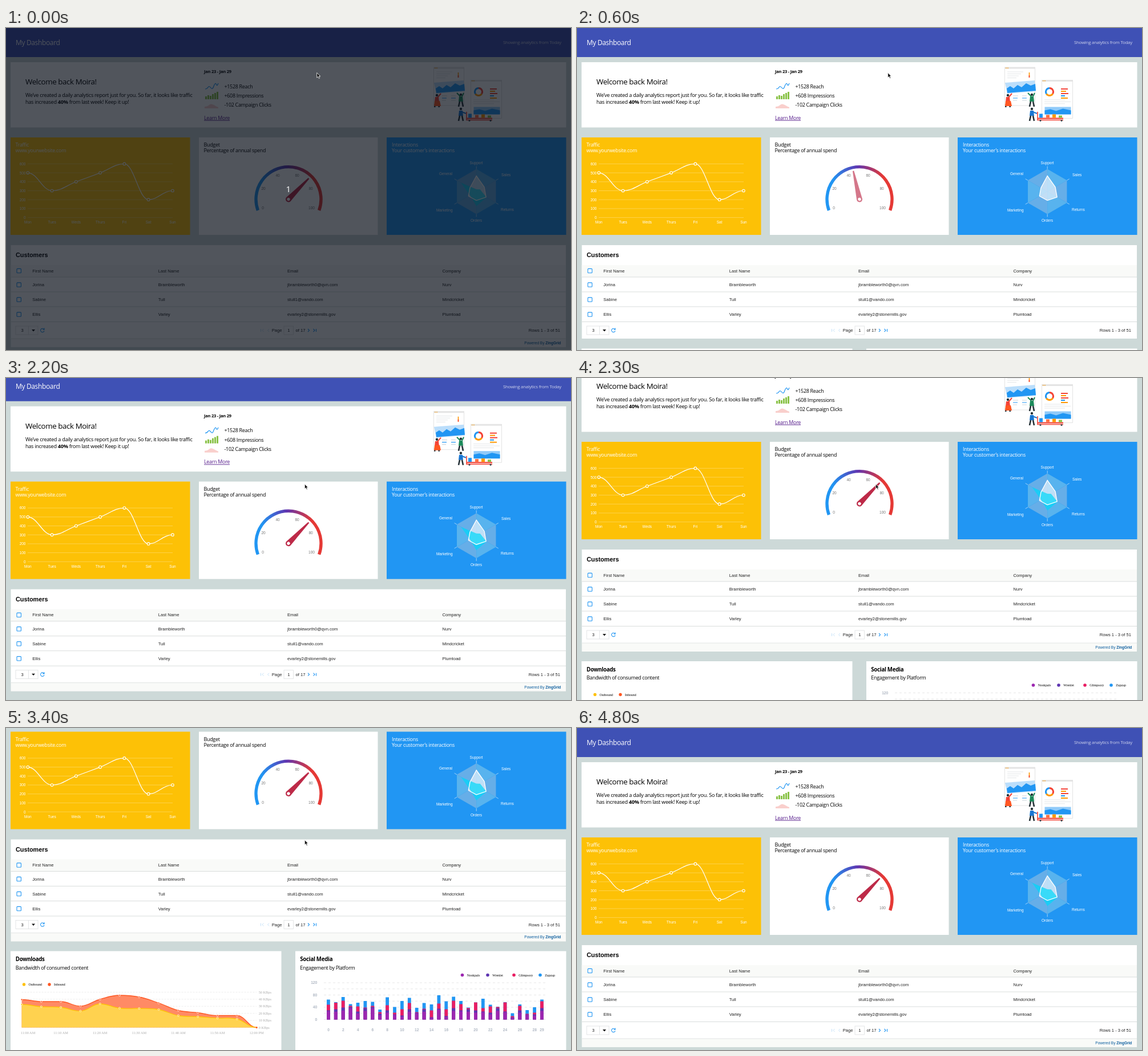
An HTML page for the animation above (5000 ms loop, 990 px wide and 565 px high).

```html
<!DOCTYPE html>
<html lang="en">
<head>
<meta charset="utf-8">
<title>My Dashboard</title>
<style>
html, body { margin: 0; width: 100%; height: 100%; overflow: hidden; background: #cdd9d8; }
svg { display: block; }
text { font: 7.6px "Liberation Sans", Arial, sans-serif; fill: #222; white-space: pre; }
.u { font: 8.9px "Open Sans", "Noto Sans", sans-serif; letter-spacing: -.03em; fill: #000; }
.s { font-size: 6.5px; }
.t { font: 6.3px "Liberation Serif", serif; fill: #aaa; }
.l { font: 5.9px "Liberation Serif", serif; fill: #000; }
.g { font-size: 6.7px; font-weight: bold; fill: #b0b8c4; }
.b { font-weight: bold; }
.w { fill: #fff; }
.m { text-anchor: middle; }
.e { text-anchor: end; }
</style>
</head>
<body>
<svg id="stage" width="990" height="565" viewBox="0 0 990 565"></svg>
<script>
const BLUE = '#2196f3', RED = '#f44336', GREEN = '#8bc34a';
const text = (x, y, s, cls = '', more = '') => `<text x="${x}" y="${y}" class="${cls}" ${more}>${s}</text>`;
const rect = (x, y, w, h, fill, more = '') => `<rect x="${x}" y="${y}" width="${w}" height="${h}" fill="${fill}" ${more}/>`;
const dot = (x, y, r, fill, more = '') => `<circle cx="${x}" cy="${y}" r="${r}" fill="${fill}" ${more}/>`;
const path = (d, fill, more = '') => `<path d="${d}" fill="${fill}" ${more}/>`;
const line = (d, color, w = 1, more = '') => path(d, 'none', `stroke="${color}" stroke-width="${w}" ${more}`);
const each = (list, f) => list.map(f).join('');
const range = n => [...Array(n).keys()];

// Smooth curve that stays level at every peak and dip
function spline(p) {
  const slope = p.map(([x, y], i) => {
    if (!i || i === p.length - 1) return 0;
    const a = y - p[i - 1][1], b = p[i + 1][1] - y;
    return a * b <= 0 ? 0 : (a + b) / (p[i + 1][0] - p[i - 1][0]);
  });
  return 'M' + p[0] + each(p.slice(1), ([x, y], i) => {
    const [x0, y0] = p[i], k = (x - x0) * .4;
    return `C${x0 + k},${y0 + slope[i] * k} ${x - k},${y - slope[i + 1] * k} ${x},${y}`;
  });
}

const header = () => rect(0, 0, 990, 51, '#3f51b5') +
  text(17, 29.8, 'My Dashboard', 'u w', 'style="font-size:12px"') +
  text(973, 28.3, 'Showing analytics from Today', 'u e', 'style="font-size:7.9px;fill:#cdd2ec"');

function illustration() {
  const person = (x, y, shirt) => dot(x, y - 7, 2.2, '#263238') +
    path(`M${x - 3},${y - 4}h6l1,9h-8z`, shirt) +
    line(`M${x - 2},${y + 5}l-2,9M${x + 2},${y + 5}l2,9`, '#263238', 2.6);
  const window = (x, y, w, h) => rect(x, y, w, h, '#fff', 'stroke="#ddd" stroke-width=".8"') +
    rect(x, y, w, 2.5, '#e4e4e4') + each([2, 4, 6], d => dot(x + d, y + 1.2, .7, '#ff9800'));
  return window(749.5, 69, 53, 67) +
    each(range(4), i => line(`M754,${77 + i * 3.5}h${28 - i * 4}`, '#e3e6e8', 1)) +
    line('M792.5,78v9', '#ff9800', 1.6) + line('M792.5,83v4', RED, 1.6) +
    path('M750,96L802,92L804,111L754,115Z', '#bbdefb') +
    path('M754,114L753,106L759,102L765,106L772,100L779,104L787,97L795,101L803,98L804,110Z', BLUE) +
    each(range(3), i => line(`M764,${119 + i * 4}h${9 - i}M780,${119 + i * 4}h8`, i == 1 ? BLUE : '#cfd8dc', 1.2)) +
    window(814.5, 91.5, 54, 67) +
    line('M828,105.5a6.5,6.5 0 0 1 5.5,10', RED, 3) + line('M833.5,115.5a6.5,6.5 0 0 1-11,0', '#ff9800', 3) +
    line('M822.5,115.5a6.5,6.5 0 0 1 5.5-10', BLUE, 3) +
    each([[13, RED], [10, '#ff9800'], [14, RED], [8, BLUE], [13, '#ff9800']], ([w, c], i) => rect(848, 106 + i * 4, w - 1, 2, c)) +
    each(range(3), i => line(`M819,${126 + i * 3.4}h${i == 1 ? 46 : 36}`, '#e3e6e8', 1)) +
    rect(819.5, 138.5, 46, 13, '#90caf9') + path('M819.5,151.5v-7l10,-2l10,3l12,-4l14,3v7z', BLUE) +
    person(755, 125, RED) + line('M756,122l6,-7', RED, 2) + path('M751,128h9l2,9h-12z', '#ff5722') +
    person(797, 124, '#1b8a5a') + line('M796,120l-6,-6M799,120l3,-6', '#1b8a5a', 2) +
    person(797, 149, '#1976d2') + line('M798,147l8,3', '#1976d2', 2) +
    line('M807,147v14.5h45', RED, 1.6) + rect(807, 157.5, 45, 2.2, RED) + dot(812, 162.5, 1.5, '#37474f') + dot(849, 162.5, 1.5, '#37474f') +
    each([[810, 7, BLUE], [822, 5, '#ff7043'], [833, 6, '#ff9800'], [844, 4, GREEN]], ([x, h, c]) => rect(x, 157.5 - h, 6, h, c));
}

const welcome = () => rect(8, 60, 973.5, 114.5, '#fff') +
  text(34, 99.2, 'Welcome back Moira!', 'u', 'style="font-size:13.3px"') +
  text(34, 121.3, 'We’ve created a daily analytics report just for you. So far, it looks like traffic', 'u', 'style="font-size:9.1px"') +
  text(34, 133.2, 'has increased <tspan class="b">40%</tspan> from last week! Keep it up!', 'u', 'style="font-size:9.1px"') +
  text(347, 79, 'Jan 23 - Jan 29', 'u b', 'style="font-size:7.5px"') +
  text(382.5, 105.8, '+1528 Reach', 'u') + text(382.5, 122, '+608 Impressions', 'u') + text(382.5, 138.2, '-102 Campaign Clicks', 'u') +
  text(347, 160.7, 'Learn More', 'u', 'style="fill:#551a8b;text-decoration:underline"') +
  line('M349,107Q352,107 354,104T359,105T364,102Q367,94 369,100Q370,102 372,97', BLUE, 1.2) +
  each([5, 7, 6, 9, 11, 13], (h, i) => rect(349 + i * 4, 125 - h, 3, h, GREEN)) +
  path('M348,141v-3q5,0 8,-3t8,0t8,4v2z', '#f9cfcc') + illustration();

function traffic() {
  const xs = range(7).map(i => 38.3 + i * 42.27), y = v => 332.6 - v * .157;
  const pts = [500, 300, 400, 500, 600, 200, 300].map((v, i) => [xs[i], y(v)]);
  return rect(8, 192, 314.5, 171, '#fdc106') + text(16.5, 208, 'Traffic', 'u w') + text(16.5, 218, 'www.yourwebsite.com', 'u w') +
    each(range(7), i => line(`M38,${y(i * 100)}H292`, '#fff', .8, 'opacity=".35"') + text(34.5, y(i * 100) + 2.4, i * 100, 's w e')) +
    each(['Mon', 'Tues', 'Weds', 'Thurs', 'Fri', 'Sat', 'Sun'], (d, i) => text(xs[i], 343.4, d, 's w m')) +
    line(spline(pts), '#fff', 1.2) + each(pts, ([x, y]) => dot(x, y, 2.3, '#fdc106', 'stroke="#fff" stroke-width="1.1"'));
}

const gauge = () => rect(338, 192, 313.5, 171, '#fff') + text(346.5, 208, 'Budget', 'u') + text(346.5, 218, 'Percentage of annual spend', 'u') +
  `<linearGradient id="arc" gradientUnits="userSpaceOnUse" x1="436" x2="554"><stop offset=".1" stop-color="${BLUE}"/>
   <stop offset=".47" stop-color="#5e35b1"/><stop offset=".85" stop-color="#e53935"/></linearGradient>` +
  line('M441.4,320A57,57 0 1 1 548.6,320', 'url(#arc)', 5.4) +
  each([[450, 316], [451, 282], [476, 258.5], [510, 258.5], [534, 282], [535.5, 316]], ([x, y], i) => text(x, y + 2.4, i * 20, 's m', 'style="fill:#777"')) +
  `<g id="needle">${path('M-1.2,-51L1.2,-51L5,0A5,5 0 0 1 -5,0Z', '#bd2a48')}${dot(0, 0, 2.7, '#fff')}</g>`;

const spoke = (r, i) => [824.2 + r * Math.sin(i * Math.PI / 3), 287 - r * Math.cos(i * Math.PI / 3)];
const star = radii => 'M' + radii.map(spoke).join('L') + 'Z';
const WHITE_R = [27.5, 16, 19.6, 15.5, 16, 13], CYAN_R = [4, 7.5, 20.5, 25.5, 13, 31];

const radar = () => rect(667, 192, 314.5, 171, BLUE) + text(676, 208, 'Interactions', 'u w') + text(676, 218, 'Your customer’s interactions', 'u w') +
  each(range(6), i => path(`M824.2,287L${spoke(39.5, i)}L${spoke(39.5, i + 1)}Z`, i % 2 ? '#66aee8' : '#58b3ee') +
    line(`M${spoke(39.5, i)}L${spoke(44.5, i)}`, '#fff', .8, 'opacity=".7"')) +
  text(824, 239.3, 'Support', 's w m') + text(868, 259.7, 'Sales', 's w') + text(867, 320.7, 'Returns', 's w') +
  text(824, 340.3, 'Orders', 's w m') + text(782.5, 321.8, 'Marketing', 's w e') + text(782, 258, 'General', 's w e') +
  `<g id="plot">${path(star(WHITE_R), '#fff', 'opacity=".6"')}<path id="cyan" fill="#00d9fa"/>${line(star(WHITE_R), '#fff', 1.3)}</g>`;

function customers() {
  const cols = [46.3, 266.7, 493, 764.5];
  const rows = [
    ['First Name', 'Last Name', 'Email', 'Company'],
    ['Jorina', 'Brambleworth', 'jbrambleworth0@qvn.com', 'Nurv'],
    ['Sabine', 'Tull', 'stull1@vando.com', 'Mindcricket'],
    ['Ellis', 'Varley', 'evarley2@stonemills.gov', 'Plumtoad']];
  const mid = [426, 450.5, 476.5, 502.5];
  const box = (x, w) => rect(x, 523, w, 15, '#fff', 'stroke="#dcdfe0" stroke-width=".8"');
  return rect(8.5, 381, 972.5, 164, '#fff') + text(17, 402.2, 'Customers', 'b', 'style="font-size:10.8px;fill:#000"') +
    rect(8.5, 416, 972.5, 21, '#f9faf8') +
    each(rows, (row, r) => each(row, (s, c) => text(cols[c], mid[r] + 2.7, s)) +
      rect(19, mid[r] - 3.6, 7.4, 7.4, '#fff', `rx="1" stroke="${BLUE}" stroke-width="1.1"`)) +
    each([437, 463, 489, 515.5], y => line(`M8.5,${y}H981`, '#d9dddc')) +
    box(17, 39) + line('M39.5,523v15', '#dcdfe0', .8) + text(28.5, 533.2, '3', 'm') + path('M45,529h6l-3,3.4z', '#111') +
    line('M66.5,528.5A3.3,3.3 0 1 0 67,531.5M67,526.5v2.7h-2.7', BLUE, 1.1) +
    line('M446.5,528v5M451.5,528l-2.5,2.5l2.5,2.5M461,528l-2.5,2.5l2.5,2.5', '#c5e2f8', 1) +
    text(465.7, 533.2, 'Page') + box(487, 16.5) + text(495.3, 533.2, '1', 'm') + text(507.5, 533.2, 'of 17') +
    line('M529,528l2.5,2.5l-2.5,2.5M538.5,528l2.5,2.5l-2.5,2.5M543.5,528v5', BLUE, 1.1) +
    text(971, 533.2, 'Rows 1 - 3 of 51', 'e') +
    `<g id="foot">${rect(8.5, 545, 972.5, 15, '#f9faf8')}${line('M8.5,545H981', '#e2e5e4')}
     ${text(972.3, 554.9, 'Powered By <tspan class="b">ZingGrid</tspan>', 's e', 'style="fill:#0b5d9e"')}</g>`;
}

function downloads() {
  const xs = range(13).map(i => 27.5 + i * 34.3), base = 711;
  const series = [
    ['#ff5722', '#ff8a65', [49, 45.5, 45.5, 37.5, 49.5, 56.5, 53.5, 43, 30, 26, 21, 21, 0]],
    ['#fec107', '#ffd24f', [40.5, 36.5, 35.5, 29, 41.5, 34, 33.5, 31.5, 21, 19, 16.5, 15, 0]]];
  return rect(8, 577, 474.5, 177.5, '#fff') + text(16.8, 594.7, 'Downloads', 'u b', 'style="font-size:9.7px"') +
    text(16.8, 609.3, 'Bandwidth of consumed content', 'u') +
    dot(31.5, 635.5, 2.7, '#fec107') + text(39.5, 637.5, 'Outbound', 'l') + dot(76, 635.5, 2.7, '#ff5722') + text(84, 637.5, 'Inbound', 'l') +
    each(range(6), i => line(`M27.5,${base - i * 12.4}H439`, '#e6e6e6', .7, 'stroke-dasharray="3 2"') + text(442.7, base + 2 - i * 12.4, i * 10 + ' KBps', 't')) +
    each(series, ([stroke, fill, hs]) => {
      const pts = hs.map((h, i) => [xs[i], base - h]), d = spline(pts);
      return path(`${d}V${base}H27.5Z`, fill) + line(d, stroke, 1.3) +
        each(pts, ([x, y]) => dot(x, y, 1.5, stroke, 'stroke="#fff" stroke-width=".7"'));
    }) + dot(439, base, 1.6, '#ff5722') +
    each(range(7), i => text(i ? xs[i * 2] : 38.5, 722, i < 6 ? `11:${i}0 AM` : '12:00 PM', 't m'));
}

function social() {
  const total = [35, 30.5, 39.5, 27, 29.5, 32.5, 31, 17.5, 39, 22, 32.5, 38, 20.5, 29, 26.5, 42.5, 32, 40, 32.5, 21, 30, 36.5, 26, 22.5, 30.5, 11, 26.5, 16.5, 21.5, 35];
  const pink = [26, 29.5, 33, 24, 23, 21, 24, 13, 25, 12, 18, 29, 13, 19, 16, 28, 18, 33, 27, 20, 30, 20, 23, 22, 30, 6, 24, 10, 12, 32];
  const indigo = [16, 18, 21, 22, 14, 20, 22, 10, 16, 9, 7, 18, 12, 18, 4, 19, 6, 20, 16, 18, 16, 14, 12, 20, 14, 4, 16, 9, 9, 20];
  const purple = indigo.map((h, i) => h * (i % 3 ? .75 : .9));
  const legend = [['Nookpals', 799.5, '#9c27b0'], ['Wrenlet', 844, '#5e35b1'], ['Glimpsory', 890, '#e91e63'], ['Zupzap', 936, BLUE]];
  return rect(507, 577, 474.5, 177.5, '#fff') + text(515.3, 594.7, 'Social Media', 'u b', 'style="font-size:9.7px"') +
    text(515.3, 609.3, 'Engagement by Platform', 'u') +
    each(legend, ([s, x, c]) => dot(x, 619, 2.8, c) + text(x + 8.2, 621, s, 'l')) +
    each(range(7), i => line(`M557,${697 - i * 10.75}H947`, '#ddd', .7, 'stroke-dasharray="4 4"')) +
    each(range(4), i => text(545.3, 699.4 - i * 21.5, i * 40, 'g e')) +
    each([[total, BLUE], [pink, '#e91e63'], [indigo, '#5e35b1'], [purple, '#9c27b0']], ([hs, c]) =>
      each(hs, (h, i) => rect(562 + i * 12.9, 697 - h, 5.8, h, c))) +
    each(range(30), i => i % 2 && i < 29 ? '' : text(565 + i * 12.9, 717.4, i, 'g m'));
}

stage.innerHTML = `<g id="page">${header()}${welcome()}${traffic()}${gauge()}${radar()}${customers()}<g id="low">${downloads()}${social()}</g></g>
  <g id="shade">${rect(0, 0, 990, 565, '#080e18', 'opacity=".7"')}${text(494.5, 288.3, '1', 'u w m', 'style="font-size:15px"')}</g>
  <path id="cursor" d="M0,0V8.6L2,6.8L3.5,10L5,9.3L3.6,6.2H6.2Z" fill="#111" stroke="#fff" stroke-width=".8"/>`;

const $ = id => document.getElementById(id);
const clamp = v => Math.max(0, Math.min(1, v));
const easeOut = (u, n) => 1 - (1 - clamp(u)) ** n;

// Each key: time, then values
function track(keys, t) {
  const j = keys.findIndex(k => k[0] > t);
  if (j < 0) return keys.at(-1).slice(1);
  if (!j) return keys[0].slice(1);
  const a = keys[j - 1], b = keys[j], u = (t - a[0]) / (b[0] - a[0]);
  return a.slice(1).map((v, i) => v + (b[i + 1] - v) * u);
}
const SCROLL = [[2100, 0], [2200, 10.3], [2300, 80], [2400, 160], [2500, 196.3], [3300, 196.3], [3400, 185.5], [3500, 85], [3600, 0]];
const POINTER = [[1700, 544.7, 78.5], [1900, 535, 120], [2100, 523.3, 186], [3100, 523.3, 186], [3400, 523.3, 196.5],
  [3900, 523.3, 196.5], [4100, 420, 150], [4300, 200, 55], [4500, 61, 4], [4700, 41, 1], [4800, 34, -20]];
const RELOAD = 300;

function draw(now) {
  const t = Math.floor(now % 5000 / 100) * 100, fresh = t < RELOAD;
  const spin = fresh ? 1 : easeOut((t - 400) / 900, 4);
  const grow = fresh ? 1 : easeOut((t - 600) / 700, 2);
  const footer = fresh || t >= 1500;
  $('page').setAttribute('transform', `translate(0 ${-track(SCROLL, t)[0]})`);
  $('cursor').setAttribute('transform', `translate(${track(POINTER, t)})`);
  $('shade').setAttribute('opacity', track([[0, 1], [99, 1], [100, .6], [200, .25], [300, 0]], t)[0]);
  $('needle').setAttribute('transform', `translate(495 300.5) rotate(${-110 + 154 * spin})`);
  $('needle').setAttribute('opacity', spin);
  $('plot').setAttribute('opacity', fresh ? 1 : clamp((t - 400) / 200));
  $('cyan').setAttribute('d', star(CYAN_R.map(r => r * grow)));
  $('cyan').setAttribute('opacity', .7 * grow);
  $('foot').setAttribute('visibility', footer ? 'visible' : 'hidden');
  $('low').setAttribute('transform', `translate(0 ${footer ? 0 : -14.5})`);
}

const start = performance.now();
(function tick() {
  draw(performance.now() - start);
  requestAnimationFrame(tick);
})();
</script>
</body>
</html>
```
